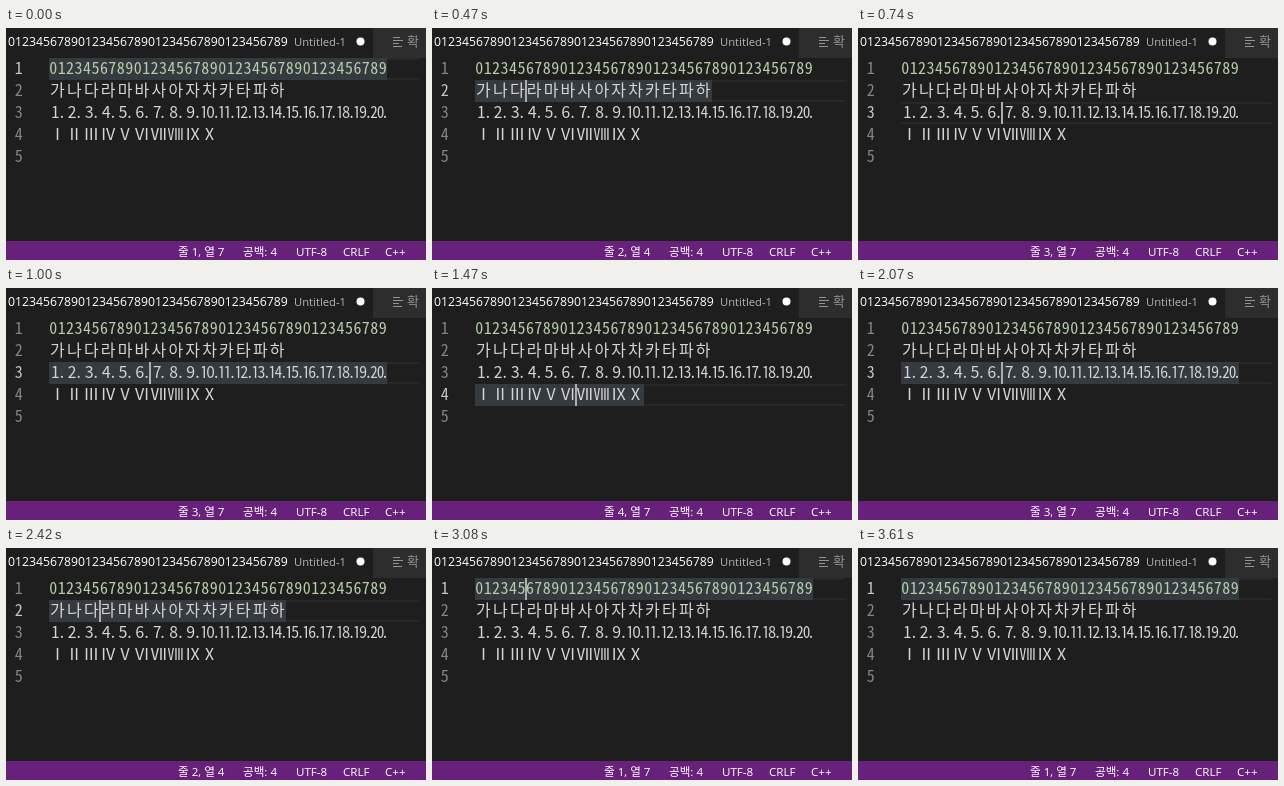
An HTML page that plays this animation: 420 by 232 pixels, repeating every 3.68 s.

```html
<!DOCTYPE html>
<html lang="ko">
<head>
<meta charset="utf-8">
<title>Editor cursor</title>
<style>
  html, body { margin: 0; width: 100%; height: 100%; overflow: hidden; background: #1e1e1e; }
  svg { display: block; width: 420px; height: 232px; }
  text { white-space: pre; }
  .ui { font-family: "Open Sans", "Noto Sans", "Noto Sans CJK KR", "Noto Sans CJK", sans-serif; }
  .code { font-family: "Noto Sans Mono CJK KR", "Noto Sans CJK KR", "Noto Sans CJK", "Noto Sans Mono", monospace;
          font-size: 16px; text-anchor: middle; }
  .status { fill: #fff; font-size: 11.6px; }
</style>
</head>
<body>
<svg id="stage" viewBox="0 0 420 232" xmlns="http://www.w3.org/2000/svg">
  <rect width="420" height="232" fill="#1e1e1e"/>
  <g id="tabs" class="ui">
    <rect x="367" width="53" height="30" fill="#2d2d2d"/>
    <text id="title" x="2" y="18" font-size="12.24" fill="#fff"></text>
    <text x="288" y="18" font-size="11.25" fill="#b4b4b4">Untitled-1</text>
    <circle cx="354.5" cy="13.5" r="4" fill="#fff"/>
    <path d="M387 9.5h7M387 12.5h10M387 15.5h6M387 18.5h9" stroke="#8f9496" stroke-width="1.2"/>
    <text x="401" y="18" font-size="13" fill="#929292">확</text>
  </g>
  <g id="active" fill="#282828">
    <rect x="43" y="0" width="370" height="2"/>
    <rect x="43" y="20" width="370" height="2"/>
  </g>
  <rect id="lit" x="43" height="22" fill="#343a40"/>
  <g id="code" class="code"></g>
  <rect id="caret" width="2" height="22" fill="#aeafad"/>
  <rect y="213" width="420" height="19" fill="#68217a"/>
  <g class="ui status">
    <text id="pos" x="172" y="228"></text>
    <text x="237" y="228">공백: 4</text>
    <text x="290" y="228">UTF-8</text>
    <text x="337" y="228">CRLF</text>
    <text x="379" y="228">C++</text>
  </g>
</svg>
<script>
  const $ = id => document.getElementById(id);
  const NS = "http://www.w3.org/2000/svg";
  const LOOP = 3680, LEFT = 43, CELL = 8.45, ROW = 22, TOP = 30;
  const rowY = line => TOP + (line - 1) * ROW;

  const charRun = (first, count) =>
    Array.from({ length: count }, (_, i) => String.fromCodePoint(first + i)).join("");
  const digits = "0123456789".repeat(4);

  // cells: columns taken by each character; col: where the cursor lands
  const lines = [
    { text: digits, cells: 1, col: 7, color: "#b5cea8" },
    { text: "가나다라마바사아자차카타파하", cells: 2, col: 4, color: "#d4d4d4" },
    { text: charRun(0x2488, 20), cells: 2, col: 7, color: "#d4d4d4" },
    { text: charRun(0x2160, 10), cells: 2, col: 7, color: "#d4d4d4" },
    { text: "", cells: 1, col: 1, color: "#d4d4d4" }
  ];

  function addText(str, x, y, color) {
    const el = document.createElementNS(NS, "text");
    el.setAttribute("x", x);
    el.setAttribute("y", y);
    el.setAttribute("fill", color);
    el.textContent = str;
    $("code").append(el);
    return el;
  }

  $("title").textContent = digits;
  const numbers = lines.map((row, i) => {
    const base = rowY(i + 1) + 16.2;
    const step = CELL * row.cells;
    const xs = [...row.text].map((_, n) => (LEFT + (n + 0.5) * step).toFixed(2));
    if (row.text) addText(row.text, xs.join(" "), base, row.color);
    return addText(i + 1, 12.7, base, "#858585");
  });

  // start ms, cursor line, highlight, line in status bar, caret
  const steps = [
    [0, 1, 1, 1, 0],
    [200, 2, 0, 2, 1],
    [470, 2, 1, 2, 1],
    [670, 3, 0, 2, 1],
    [740, 3, 0, 3, 1],
    [1000, 3, 1, 3, 1],
    [1200, 4, 0, 4, 1],
    [1470, 4, 1, 4, 1],
    [1730, 3, 0, 4, 1],
    [1800, 3, 0, 3, 1],
    [2070, 3, 1, 3, 1],
    [2200, 2, 0, 2, 1],
    [2420, 2, 1, 2, 1],
    [2670, 1, 0, 2, 1],
    [2800, 1, 0, 1, 1],
    [3080, 1, 1, 1, 1],
    [3340, 1, 1, 1, 0]
  ];

  const show = (el, on) => el.setAttribute("visibility", on ? "visible" : "hidden");

  function draw(ms) {
    const [, line, lit, statusLine, caret] = steps.filter(s => s[0] <= ms).pop();
    const row = lines[line - 1], y = rowY(line);
    $("active").setAttribute("transform", `translate(0 ${y})`);
    $("lit").setAttribute("y", y);
    $("lit").setAttribute("width", Math.round(row.text.length * row.cells * CELL));
    show($("lit"), lit);
    $("caret").setAttribute("x", Math.floor(LEFT - 0.5 + (row.col - 1) * row.cells * CELL));
    $("caret").setAttribute("y", y);
    show($("caret"), caret);
    numbers.forEach((n, i) => n.setAttribute("fill", i + 1 === line ? "#c6c6c6" : "#858585"));
    $("pos").textContent = `줄 ${statusLine}, 열 ${lines[statusLine - 1].col}`;
  }

  const start = performance.now();
  function tick() {
    draw((performance.now() - start) % LOOP);
    requestAnimationFrame(tick);
  }
  tick();
</script>
</body>
</html>
```
